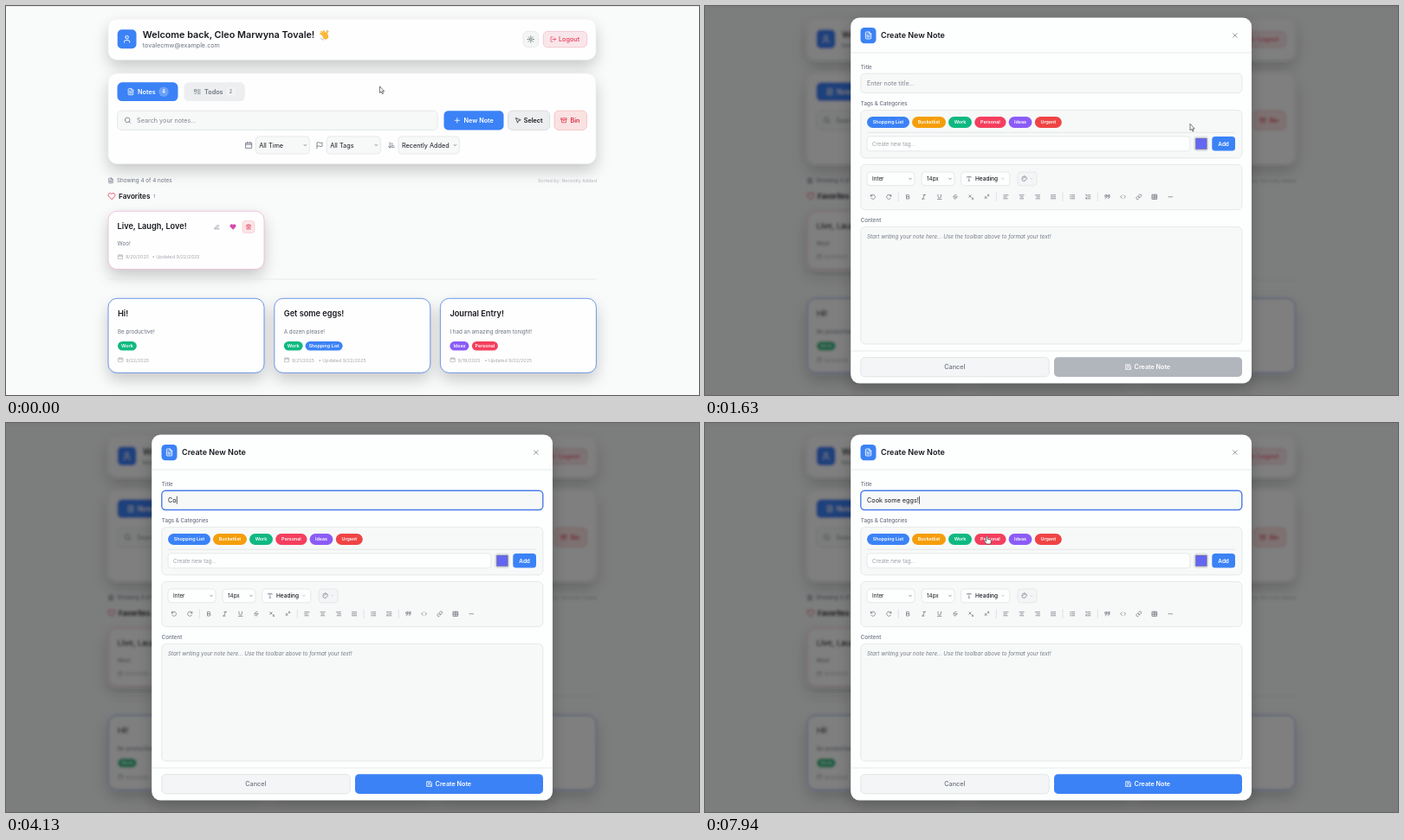
An HTML page for the animation above (8 s loop, 800 by 450 pixels).

```html
<!DOCTYPE html>
<html lang="en">
<head>
<meta charset="utf-8">
<title>Notes</title>
<style>
html, body { margin: 0; width: 100%; height: 100%; overflow: hidden; background: #f9fafa; }
svg { display: block; width: 100vw; height: 100vh; }
text { font-family: Inter, "Open Sans", sans-serif; white-space: pre; }
</style>
</head>
<body>
<svg id="stage" viewBox="0 0 800 450" xmlns="http://www.w3.org/2000/svg"></svg>
<script>
const LOOP = 8000;
const BLUE = '#3b82f6', RED = '#e83a58', GREEN = '#10b981', ORANGE = '#f59e0b',
      ROSE = '#f43f5e', VIOLET = '#8b5cf6', INK = '#17191f', GRAY = '#6b7280',
      PALE = '#a3a7ae', FIELD = '#f7f9f9', EDGE = '#e0e4e5';

// Icons on a 24-unit grid, drawn as strokes
const ICONS = {
  user: 'M5 21v-2a4 4 0 0 1 4-4h6a4 4 0 0 1 4 4v2M8 7a4 4 0 1 0 8 0a4 4 0 1 0-8 0',
  file: 'M14 2H6a2 2 0 0 0-2 2v16a2 2 0 0 0 2 2h12a2 2 0 0 0 2-2V8zV8h6M8 13h8M8 17h8M8 9h2',
  sun: 'M8 12a4 4 0 1 0 8 0a4 4 0 1 0-8 0M12 1v3M12 20v3M1 12h3M20 12h3M4 4l2 2M18 18l2 2M4 20l2-2M18 6l2-2',
  logout: 'M9 21H5a2 2 0 0 1-2-2V5a2 2 0 0 1 2-2h4M16 17l5-5-5-5M21 12H9',
  todo: 'M3 5h6v6H3zM3 17l2 2 4-4M13 6h8M13 12h8M13 18h8',
  search: 'M3 11a8 8 0 1 0 16 0a8 8 0 1 0-16 0M21 21l-4.3-4.3',
  plus: 'M5 12h14M12 5v14',
  pointer: 'M4 4l7 17 2.5-7.5L21 11z',
  bin: 'M2 4h20v5H2zM4 9v11h16V9M10 13h4',
  calendar: 'M3 5h18v16H3zM3 10h18M8 2v5M16 2v5',
  flag: 'M4 22V4c5-4 9 4 16 0v11c-7 4-11-4-16 0',
  sort: 'M3 16l4 4 4-4M7 20V4M12 8h3M12 13h6M12 18h9',
  heart: 'M12 21L3 12C-1 7 6-1 12 6C18-1 25 7 21 12z',
  edit: 'M12 20h9M4 16L16 4l4 4L8 20H4z',
  trash: 'M3 6h18M19 6v15H5V6M8 6V3h8v3M10 11v6M14 11v6',
  close: 'M5 5l14 14M19 5L5 19',
  chevron: 'M5 8l7 8 7-8',
  save: 'M3 3h14l4 4v14H3zM7 3v6h8V3M7 21v-8h10v8',
  type: 'M4 7V4h16v3M12 4v16M9 20h6',
  palette: 'M12 2a10 10 0 1 0 0 20c4 0 0-6 5-6c8 0 6-14-5-14M7 11h1M11 7h1M16 8h1',
  undo: 'M3 3v6h6M3 9a9 9 0 1 1 1 8',
  redo: 'M21 3v6h-6M21 9a9 9 0 1 0-1 8',
  bold: 'M6 12h8a4 4 0 0 1 0 8H6V4h7a4 4 0 0 1 0 8',
  italic: 'M10 4h9M5 20h9M15 4L9 20',
  underline: 'M6 3v7a6 6 0 0 0 12 0V3M4 21h16',
  strike: 'M17 5C10 2 5 6 8 10M4 12h16M15 13c5 5-3 9-9 5',
  sub: 'M4 5l8 9M12 5l-8 9M16 16h4l-4 5h5',
  sup: 'M4 10l8 9M12 10l-8 9M16 3h4l-4 5h5',
  left: 'M3 5h18M3 12h12M3 19h15',
  center: 'M3 5h18M7 12h10M5 19h14',
  right: 'M3 5h18M9 12h12M6 19h15',
  justify: 'M3 5h18M3 12h18M3 19h18',
  list: 'M3 5h1M3 12h1M3 19h1M8 5h13M8 12h13M8 19h13',
  ordered: 'M3 3h2v5M3 15h3l-3 5h3M10 5h11M10 12h11M10 19h11',
  quote: 'M10 5H3v7h6c0 4-2 6-5 7M10 5v7M21 5h-7v7h6c0 4-2 6-5 7M21 5v7',
  code: 'M16 18l6-6-6-6M8 6l-6 6 6 6',
  link: 'M10 13a5 5 0 0 0 7 1l4-4a5 5 0 0 0-7-7l-2 2M14 11a5 5 0 0 0-7-1l-4 4a5 5 0 0 0 7 7l2-2',
  table: 'M3 3h18v18H3zM3 9h18M3 15h18M12 3v18',
  minus: 'M4 12h16'
};

const rect = (x, y, w, h, r, fill, stroke = 'none', extra = '') =>
  `<rect x="${x}" y="${y}" width="${w}" height="${h}" rx="${r}" fill="${fill}" stroke="${stroke}" stroke-width=".8" ${extra}/>`;
const label = (x, y, str, size, fill = INK, weight = 400, extra = '') =>
  `<text x="${x}" y="${y}" font-size="${size}" fill="${fill}" font-weight="${weight}" ${extra}>${str}</text>`;
const MID = 'text-anchor="middle"';
const icon = (name, cx, cy, size, color, fill = 'none') =>
  `<path d="${ICONS[name]}" transform="translate(${cx - size / 2} ${cy - size / 2}) scale(${size / 24})"
    fill="${fill}" stroke="${color}" stroke-width="2.2" stroke-linecap="round" stroke-linejoin="round"/>`;
const line = (x1, y1, x2, y2, color = EDGE) =>
  `<path d="M${x1} ${y1}L${x2} ${y2}" stroke="${color}" stroke-width=".8"/>`;
const pill = (x, y, w, h, str, color) =>
  rect(x, y, w, h, h / 2, color) + label(x + w / 2, y + h / 2 + 1.95, str, 5.35, '#fff', 600, MID);
const card = (x, y, w, h, stroke = '#f0f1f2') =>
  rect(x, y + 8, w, h, 10, '#000', 'none', 'opacity=".2" filter="url(#shadow)"') +
  rect(x, y, w, h, 10, '#fefefe', stroke);
const select = (x, y, w, h, str, size, pad, fill) =>
  rect(x, y, w, h, 4, fill, EDGE) + label(x + pad, y + h / 2 + size * .36, str, size) +
  icon('chevron', x + w - 5, y + h / 2, 4.5, INK);

function dateRow(x, y, created, updated) {
  return icon('calendar', x + 3.4, y - 2.2, 6.5, PALE) + label(x + 9.2, y, created, 5.4, PALE) +
    (updated ? label(x + 40, y, '• Updated ' + updated, 5.4, PALE) : '');
}

function noteCard(x, title, body, tags, created, updated) {
  return card(x, 338.3, 180, 86, '#4c82e6') +
    label(x + 11, 359, title, 9.2, INK, 600) + label(x + 11, 378.7, body, 6.25, GRAY) +
    tags.map(([dx, w, name, color]) => pill(x + dx, 388, w, 10.6, name, color)).join('') +
    dateRow(x + 11, 411.5, created, updated);
}

const wave = `<g transform="translate(367.5 34) rotate(-14)" stroke-linecap="round" fill="none">
  <path d="M-1 0L-3.8-3.2M.3-1L-2.2-5M2-1L.5-5M3-.5L4-3.3" stroke="#fbb83a" stroke-width="1.9"/>
  <ellipse cx="1" cy="1.3" rx="3.3" ry="3.6" fill="#fbb83a"/>
  <path d="M-4.7 2.2q.6 2 2.4 2.6M4.2-5q1.3.5 1.5 2" stroke="#8b9098" stroke-width=".6"/></g>`;

const page = line(0, .3, 800, .3, '#dfe2e4') +
  card(118, 15, 563, 47.3) + card(118, 78, 563, 104.5) +
  rect(128.7, 27.3, 21.8, 22, 5, BLUE) + icon('user', 139.6, 38.3, 10.5, '#fff') +
  label(157.8, 37.2, 'Welcome back, Cleo Marwyna Tovale!', 10.8, INK, 600) + wave +
  label(157.8, 48.2, 'tovalecmw@example.com', 7.2, GRAY) +
  rect(597, 29.5, 17.5, 18, 5, '#f4f6f6', '#e3e6e8') + icon('sun', 605.8, 38.5, 8, '#444951') +
  rect(620.3, 29.4, 50.4, 18.4, 5, '#f9e6ea', '#f3bfc9') + icon('logout', 631.8, 38.5, 7.5, RED) +
  label(638, 41.2, 'Logout', 7.25, RED, 500) +

  rect(128.5, 88.3, 70, 21.8, 5.5, BLUE) + icon('file', 144, 99.2, 8.5, '#fff') +
  label(152, 101.9, 'Notes', 7.25, '#fff', 600) +
  '<circle cx="182" cy="99.3" r="5.7" fill="#fff" opacity=".25"/>' + label(182, 101.3, '4', 5.5, '#fff', 600, MID) +
  rect(205.5, 88.3, 70.3, 21.8, 5.5, '#eceeef') + icon('todo', 221, 99.2, 8.5, GRAY) +
  label(229, 101.9, 'Todos', 7.25, GRAY, 600) +
  '<circle cx="259.5" cy="99.3" r="5.7" fill="#f2f3f4"/>' + label(259.5, 101.3, '2', 5.5, GRAY, 500, MID) +

  rect(128.5, 121.2, 369.7, 22.2, 5, FIELD, EDGE) + icon('search', 140.5, 132.2, 8.5, GRAY) +
  label(151, 134.9, 'Search your notes...', 7.25, '#80858e') +
  '<g id="newNote">' + rect(505.5, 121.2, 69, 22.2, 5, BLUE) + icon('plus', 520.8, 132.3, 9, '#fff') +
  label(528.6, 134.9, 'New Note', 7.25, '#fff', 600) + '</g>' +
  rect(579.5, 121.2, 48.2, 22.2, 5, '#eceeef', '#d5d9dc') + icon('pointer', 591, 132.3, 7.5, INK) +
  label(597.8, 134.9, 'Select', 7.2, INK, 600) +
  rect(633, 121.2, 37.5, 22.2, 5, '#fae2e2', '#f3bcbc') + icon('bin', 644, 132.3, 7.5, '#dc2f45') +
  label(651.4, 134.9, 'Bin', 7.2, '#dc2f45', 600) +

  icon('calendar', 280.3, 161, 9, GRAY) + select(288.3, 151, 62, 20, 'All Time', 7.3, 4, FIELD) +
  icon('flag', 362, 161, 9, GRAY) + select(370.3, 151, 62, 20, 'All Tags', 7.3, 4, FIELD) +
  icon('sort', 445, 161, 9, GRAY) + select(453, 151, 70.3, 20, 'Recently Added', 7.3, 4, FIELD) +

  icon('file', 121, 202, 7, GRAY) + label(128, 204.4, 'Showing 4 of 4 notes', 6.3, GRAY) +
  label(682, 203.9, 'Sorted by: Recently Added', 5.4, '#b3b7bd', 400, 'text-anchor="end"') +
  icon('heart', 122, 220, 9.5, RED) + label(130, 223, 'Favorites', 8.2, INK, 600) + label(170, 222, '1', 5.4, GRAY) +

  card(118, 237.3, 180, 67.2, '#efb6d6') + label(128.6, 257.8, 'Live, Laugh, Love!', 9.2, INK, 600) +
  icon('edit', 243.5, 255.6, 7, GRAY) + icon('heart', 262, 255.4, 7.5, '#c53aa0', '#d946b0') +
  rect(273, 248.6, 14, 14, 3.5, '#fbe5e7', '#f6ccd2') + icon('trash', 280, 255.5, 7, RED) +
  label(128.6, 277.2, 'Woo!', 6.25, GRAY) + dateRow(128.7, 292.3, '9/20/2025', '9/22/2025') +
  line(118, 316, 682, 316, '#e3e6e7') +

  noteCard(118, 'Hi!', 'Be productive!', [[11, 21.8, 'Work', GREEN]], '9/22/2025') +
  noteCard(309.8, 'Get some eggs!', 'A dozen please!',
    [[11, 21.8, 'Work', GREEN], [35.8, 43, 'Shopping List', BLUE]], '9/21/2025', '9/22/2025') +
  noteCard(501.4, 'Journal Entry!', 'I had an amazing dream tonight!',
    [[11, 22, 'Ideas', VIOLET], [36.5, 30, 'Personal', ROSE]], '9/19/2025', '9/22/2025');

const tools = ['undo redo', 'bold italic underline strike sub sup', 'left center right justify',
  'list ordered', 'quote code link table minus'];
let toolX = 194;
const toolbar = tools.map((group, i) => {
  const icons = group.split(' ').map(name => {
    const out = icon(name, toolX, 220.8, 7, '#5b606a');
    toolX += 18.2;
    return out;
  }).join('');
  const divider = i < 4 ? line(toolX - 7.2, 215.5, toolX - 7.2, 226, '#d9dddf') : '';
  toolX += 3.9;
  return icons + divider;
}).join('');

const tagPills = [[187, 49, 'Shopping List', BLUE], [239, 39, 'Bucketlist', ORANGE], [281, 27, 'Work', GREEN],
  [311.2, 36.3, 'Personal', ROSE], [350.6, 26.8, 'Ideas', VIOLET], [380.8, 31, 'Urgent', '#ef4444']]
  .map(([x, w, name, color]) => pill(x, 128, w, 13, name, color)).join('');

const modal =
  rect(168, 20, 463, 423, 10, '#000', 'none', 'opacity=".22" filter="url(#shadow)"') +
  rect(168.2, 13.5, 462.8, 423, 10, '#fdfefe') +
  line(168, 54, 631, 54) + line(168, 399, 631, 399) +
  rect(179.5, 25, 18, 18.2, 4.5, BLUE) + icon('file', 188.5, 34, 9.5, '#fff') +
  label(203, 37.3, 'Create New Note', 9, INK, 600) + icon('close', 611.8, 34, 8, GRAY) +
  label(179.8, 72.5, 'Title', 6.2, GRAY, 500) +
  '<rect id="titleBox" x="179.8" y="78.2" width="440" height="22.3" rx="4.5" fill="' + FIELD + '"/>' +
  label(187, 92, 'Enter note title...', 7.1, '#80858e', 400, 'id="placeholder"') +
  label(187, 92, '', 7.25, INK, 400, 'id="typed"') +
  '<rect id="caret" y="84.7" width=".7" height="9" fill="#17191f"/>' +
  label(179.8, 115, 'Tags &amp; Categories', 6.2, GRAY, 500) +
  rect(179.8, 120.6, 440, 55.2, 5, FIELD, EDGE) + tagPills + line(187, 146.3, 612, 146.3) +
  rect(187, 150.8, 373, 17, 3.5, '#fdfefe', EDGE) + label(193, 161.7, 'Create new tag...', 6.2, '#9ba0a7') +
  rect(564.7, 151, 16.2, 16.6, 3, '#f3f4f5', '#d3d7da') + rect(566.3, 153, 13, 12.8, .5, '#6366f1', '#777a90') +
  rect(585.3, 151, 26.7, 16.6, 3.5, BLUE) + label(598.6, 161.7, 'Add', 6.4, '#fff', 600, MID) +
  rect(179.8, 183.6, 440, 52, 5, FIELD, EDGE) +
  select(187, 192, 55, 15.8, 'Inter', 6.3, 6, '#fdfefe') + select(250, 192, 38, 15.8, '14px', 6.3, 6, '#fdfefe') +
  rect(295.6, 192, 56.2, 15.8, 3.5, '#fdfefe', EDGE) + icon('type', 304.8, 199.8, 7, GRAY) +
  label(312, 202.2, 'Heading', 6.5, INK, 500) + icon('chevron', 343.8, 199.8, 4, GRAY) +
  rect(361, 192, 22, 15.8, 3.5, '#f3f5f6', EDGE) + icon('palette', 368.7, 199.8, 7, GRAY) +
  icon('chevron', 377, 199.8, 3.8, PALE) + toolbar +
  label(179.8, 250, 'Content', 6.2, GRAY, 500) + rect(179.8, 255.6, 440, 135.5, 5, FIELD, EDGE) +
  label(187, 268.8, 'Start writing your note here... Use the toolbar above to format your text!',
    6.28, '#747983', 400, 'font-style="italic"') +
  rect(179.8, 406.6, 217.4, 22.2, 4.5, '#f3f5f6', '#dde1e3') + label(288.3, 420.3, 'Cancel', 7.25, GRAY, 500, MID) +
  '<rect id="createButton" x="403" y="406.3" width="217" height="22.6" rx="4.5"/>' +
  icon('save', 488.7, 417.6, 7.5, '#fff') + label(495.6, 420.3, 'Create Note', 7.2, '#fff', 600);

const $ = id => document.getElementById(id);
$('stage').innerHTML = `<defs>
  <filter id="shadow" x="-30%" y="-80%" width="160%" height="260%"><feGaussianBlur stdDeviation="9"/></filter>
  <filter id="blur" filterUnits="userSpaceOnUse" x="0" y="0" width="800" height="450"><feGaussianBlur stdDeviation="1.7"/></filter>
  </defs>
  <rect width="800" height="450" fill="#f9fafa"/><g id="page">${page}</g>
  <g id="dialog"><rect width="800" height="450" opacity=".5"/>${modal}</g>
  <path id="cursor" stroke-linejoin="round"/>`;

const POINTERS = {
  arrow: 'M0 0V7.5L1.7 6L3 8.8L4.1 8.2L2.9 5.6H5.2Z',
  hand: 'M-.9.9a.9.9 0 0 1 1.8 0V3.6L4 4.3Q5 4.6 4.8 6L4.2 9.2H-.6L-2.9 6.2Q-3.2 4.8-2 5L-.9 6Z',
  beam: 'M-1.5-3.5Q0-3.5 0-2.7Q0-3.5 1.5-3.5M0-2.7V2.7M-1.5 3.5Q0 3.5 0 2.7Q0 3.5 1.5 3.5'
};
const OPEN = 1630, FOCUS = 3250, TYPE = 4000, MOVE_AGAIN = 7190;
const TITLE = 'Cook some eggs!';
const keyTimes = [...TITLE].map((_, i) =>
  i < 10 ? TYPE + i * 105 : i < 14 ? 5030 + (i - 10) * 70 : 5500);

// Pointer stops: [start, end, x, y] with an eased move into each
const STOPS = [[0, 0, 431.5, 93], [440, 1190, 560, 136.3], [2310, 3060, 379, 91], [MOVE_AGAIN, 7900, 325.5, 130.8]];
const ease = p => p * p * (3 - 2 * p);

function pointerAt(t) {
  let [, , x, y] = STOPS[0];
  for (const [start, end, nextX, nextY] of STOPS.slice(1)) {
    const p = ease(Math.min(1, Math.max(0, (t - start) / (end - start))));
    x += (nextX - x) * p;
    y += (nextY - y) * p;
  }
  return [x, y];
}

const show = (id, visible) => $(id).setAttribute('display', visible ? 'inline' : 'none');

function draw(t) {
  const open = t >= OPEN, focused = t >= FOCUS;
  const [x, y] = pointerAt(t);
  const hover = !open && x > 505 && y > 121;

  $('page').setAttribute('filter', open ? 'url(#blur)' : 'none');
  show('dialog', open);
  const button = $('newNote');
  button.setAttribute('transform', hover ? 'translate(540 132.3) scale(1.02) translate(-540 -132.3)' : '');
  button.firstChild.setAttribute('fill', hover ? '#60a1f8' : BLUE);

  const count = keyTimes.filter(k => k <= t).length;
  $('typed').textContent = TITLE.slice(0, count);
  show('placeholder', !count);
  $('createButton').setAttribute('fill', count ? BLUE : '#b1b5bc');
  $('titleBox').setAttribute('stroke', focused ? '#4b7bea' : EDGE);
  $('titleBox').setAttribute('stroke-width', focused ? 1.4 : .8);

  const lastInput = count ? keyTimes[count - 1] : FOCUS;
  show('caret', focused && (t - lastInput) % 1000 < 500);
  $('caret').setAttribute('x', 187.2 + (count ? $('typed').getComputedTextLength() : 0));

  const overTitle = open && x > 180 && x < 620 && y > 78 && y < 101;
  const overTag = open && x > 187 && x < 412 && y > 128 && y < 141;
  const kind = overTitle ? 'beam' : hover || overTag ? 'hand' : 'arrow';
  const cursor = $('cursor');
  show('cursor', t < TYPE || t >= MOVE_AGAIN);
  cursor.setAttribute('d', POINTERS[kind]);
  cursor.setAttribute('transform', `translate(${x} ${y})`);
  cursor.setAttribute('fill', kind === 'beam' ? 'none' : '#fff');
  cursor.setAttribute('stroke', '#3b3d42');
  cursor.setAttribute('stroke-width', .7);
}

const began = performance.now();
function tick() {
  draw((performance.now() - began) % LOOP);
  requestAnimationFrame(tick);
}
tick();
</script>
</body>
</html>
```
